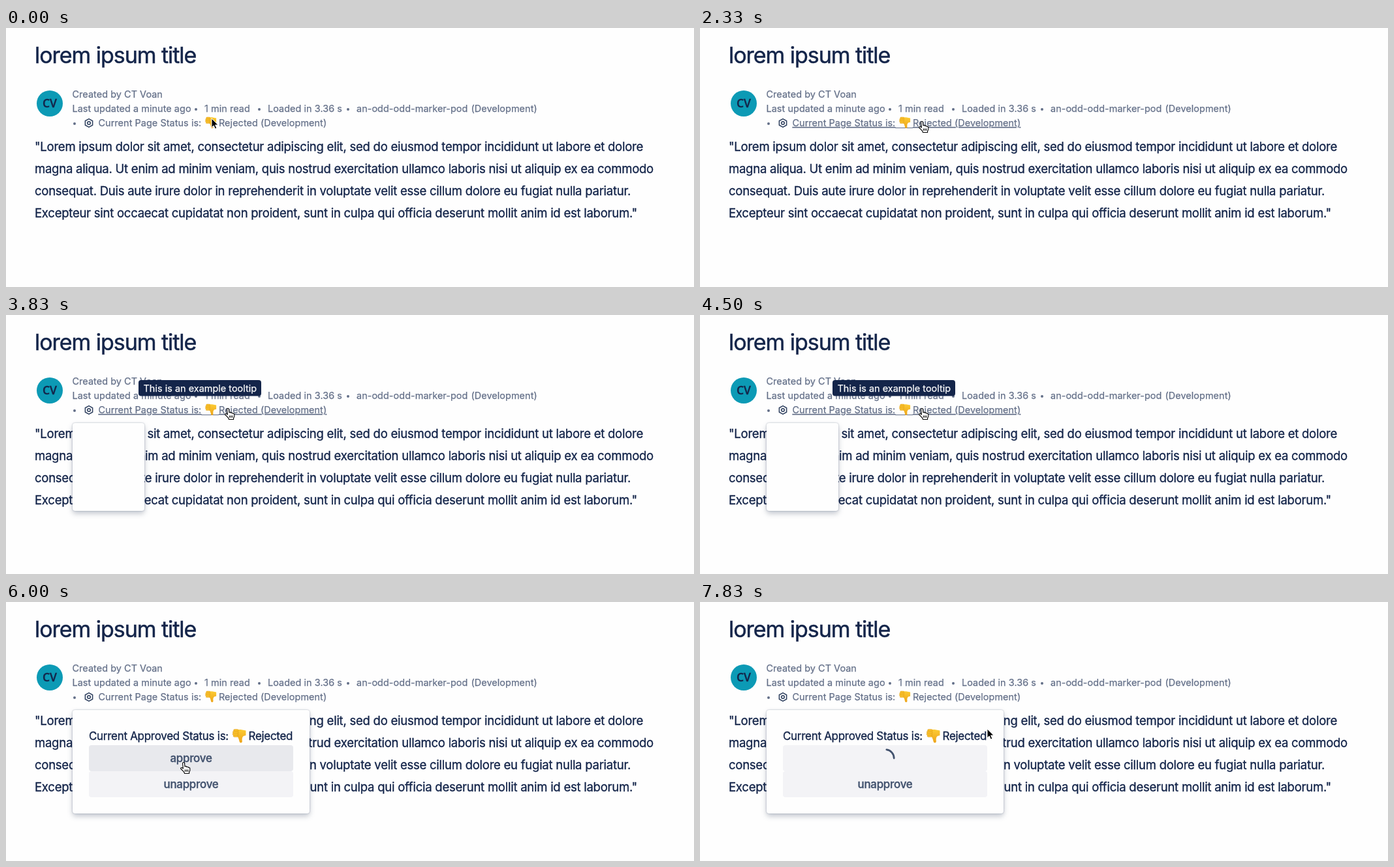
An HTML page that plays this animation: 1054 by 398 pixels, repeating every 8000 ms.

```html
<!DOCTYPE html>
<html lang="en">
<head>
<meta charset="utf-8">
<title>Page byline status</title>
<style>
  html, body { margin: 0; width: 100%; height: 100%; overflow: hidden; background: #fefefe; }
  svg { display: block; width: 1054px; height: 398px; }
  text {
    font-family: Inter, "Liberation Sans", sans-serif;
    font-optical-sizing: none;
    fill: #14254a;
    stroke: #14254a;
    stroke-width: .35px;
    white-space: pre;
  }
  .title { font-size: 34px; letter-spacing: -1.04px; stroke-width: .5px; }
  .body text { font-size: 18.5px; letter-spacing: -.246px; }
  .byline text { font-size: 14.4px; letter-spacing: .07px; fill: #636f88; stroke: #636f88; stroke-width: .25px; }
  .byline circle { fill: #636f88; }
  .initials { font: 600 17.5px "Open Sans", "Noto Sans", sans-serif; text-anchor: middle; }
  .tip rect { fill: #14254a; }
  .tip text { font-size: 14.4px; letter-spacing: .04px; fill: #fff; stroke: #fff; stroke-width: .25px; }
  .card { fill: #fefefe; filter: drop-shadow(0 4px 4px rgba(9,30,66,.2)) drop-shadow(0 0 1px rgba(9,30,66,.31)); }
  .panel text { font-size: 16.9px; letter-spacing: -.24px; }
  .panel .label { font-weight: 500; text-anchor: middle; fill: #42526e; stroke: #42526e; }
  .button { fill: #f3f3f6; }
  .spinner { fill: none; stroke: #42526e; stroke-linecap: round; }
  .linked text { text-decoration: underline; }
  #bridge { stroke: #636f88; }
</style>
</head>
<body>
<svg viewBox="0 0 1054 398">
  <defs>
    <linearGradient id="skin" x2="0" y2="1">
      <stop stop-color="#fccb33"/>
      <stop offset="1" stop-color="#eda41b"/>
    </linearGradient>
    <g id="thumb">
      <path fill="url(#skin)" d="M4 1L11 .8 17.6 2V8.2L14.6 9C12.8 10.6 12.6 12.6 13 15.6 13.1 17.8 10.4 18.2 9.6 16.2 9 13.6 8.4 11.6 7 9.6Z"/>
      <g fill="#fbc42a" stroke="#dd9614" stroke-width=".5">
        <rect x="2.2" y=".6" width="6" height="2.4" rx="1.2"/>
        <rect x="1.2" y="2.9" width="7" height="2.5" rx="1.2"/>
        <rect x="1" y="5.3" width="7" height="2.5" rx="1.2"/>
        <rect x="1.8" y="7.7" width="6" height="2.4" rx="1.2"/>
      </g>
    </g>
  </defs>

  <text class="title" x="44" y="54">lorem ipsum title</text>

  <circle cx="67" cy="116" r="20" fill="#0c9ab5"/>
  <text class="initials" x="67" y="122.3">CV</text>

  <g class="byline">
    <text x="101.5" y="107">Created by CT Voan</text>
    <text x="101.5" y="129">Last updated a minute ago</text>
    <text x="304" y="129">1 min read</text>
    <text x="401" y="129">Loaded in 3.36 s</text>
    <text x="537" y="129">an-odd-odd-marker-pod</text>
    <text x="712.5" y="129">(Development)</text>
    <circle cx="291" cy="125" r="2"/>
    <circle cx="388" cy="125" r="2"/>
    <circle cx="524" cy="125" r="2"/>
    <circle cx="105" cy="147" r="2"/>
    <g fill="none" stroke="#344563" stroke-width="1.6" stroke-linejoin="round">
      <path d="M127 139.6L132.6 142.8V149.2L127 152.4 121.4 149.2V142.8Z"/>
      <path d="M129.3 146a2.3 2.3 0 1 1-4.6 0a2.3 2.3 0 1 1 4.6 0Z"/>
    </g>
    <g id="status">
      <text x="141.5" y="151">Current Page Status is:</text>
      <text x="326" y="151">Rejected (Development)</text>
      <path id="bridge" d="M299 153.5H326"/>
    </g>
    <use href="#thumb" x="304.5" y="136.5"/>
  </g>

  <g class="body">
    <text x="44" y="189">"Lorem ipsum dolor sit amet, consectetur adipiscing elit, sed do eiusmod tempor incididunt ut labore et dolore</text>
    <text x="44" y="223">magna aliqua. Ut enim ad minim veniam, quis nostrud exercitation ullamco laboris nisi ut aliquip ex ea commodo</text>
    <text x="44" y="257">consequat. Duis aute irure dolor in reprehenderit in voluptate velit esse cillum dolore eu fugiat nulla pariatur.</text>
    <text x="44" y="291">Excepteur sint occaecat cupidatat non proident, sunt in culpa qui officia deserunt mollit anim id est laborum."</text>
  </g>

  <g id="loader">
    <rect class="card" x="102" y="166" width="110" height="135" rx="4"/>
    <path id="bigSpin" class="spinner" stroke-width="5.6"/>
  </g>

  <g id="panel" class="panel">
    <rect class="card" x="102" y="166" width="363" height="159" rx="4"/>
    <text x="127" y="212">Current Approved Status is:</text>
    <use href="#thumb" transform="translate(346 195) scale(1.22)"/>
    <text x="371.5" y="212">Rejected</text>
    <rect id="approve" class="button" x="127" y="220" width="313" height="40" rx="4"/>
    <rect class="button" x="127" y="260" width="313" height="40" rx="4"/>
    <text id="approveLabel" class="label" x="283.5" y="246">approve</text>
    <text class="label" x="283.5" y="286">unapprove</text>
    <path id="smallSpin" class="spinner" stroke-width="2.8"/>
  </g>

  <g id="tip" class="tip">
    <rect x="203" y="100" width="188" height="24.5" rx="4"/>
    <text x="210.5" y="118">This is an example tooltip</text>
  </g>

  <g id="cursor">
    <circle id="ring" r="28.5" fill="none" stroke="#000" stroke-width="3"/>
    <path id="arrow" stroke="#fff" d="M0 0V14L3.2 11 5.4 16 7.8 15 5.6 10H10Z"/>
    <g id="hand" fill="#fff" stroke="#000" stroke-width="1.1" stroke-linejoin="round">
      <path d="M-1.5 2C-1.5 0 1.4 0 1.5 2L2 7C2.6 6 4.6 6.2 4.8 7.6 5.6 6.9 7.2 7.3 7.4 8.5 8.4 8 9.8 8.6 9.8 10V13L8.6 15.5V17.5H1.5L1 15.8-1 13.4-4 10.5C-5 9.2-3.6 8-2.2 8.8L-.6 10Z"/>
      <path d="M2.4 11.5V14.8M4.6 11.5V14.8M6.8 11.5V14.8"/>
    </g>
  </g>
</svg>
<script>
  const LOOP = 8000, FPS = 6;
  const $ = id => document.getElementById(id);

  // Pointer stops: time, x, y
  const route = [
    [0, 315, 139], [1830, 315, 139], [2165, 340, 143], [4660, 340, 143],
    [5165, 276, 259], [5500, 272, 246], [6830, 272, 246], [7660, 440, 195], [LOOP, 440, 195]
  ];

  const clamp = v => Math.min(1, Math.max(0, v));
  const within = (t, from, to) => t >= from - 5 && t < to - 5;
  const show = (id, on) => { $(id).style.display = on ? '' : 'none'; };

  function pointer(t) {
    const i = Math.max(1, route.findIndex(stop => stop[0] > t));
    const [t0, x0, y0] = route[i - 1], [t1, x1, y1] = route[i];
    const p = clamp((t - t0) / (t1 - t0)), e = p * p * (3 - 2 * p);
    return [x0 + (x1 - x0) * e, y0 + (y1 - y0) * e];
  }

  // The arc grows and fades in for one second, then keeps turning.
  function spin(id, cx, cy, r, age) {
    const p = clamp(age / 1000) ** 2;
    const start = 122 + 156 * p + Math.max(0, age - 1000) / 860 * 360;
    const at = deg => {
      const a = deg * Math.PI / 180;
      return `${cx + r * Math.cos(a)} ${cy + r * Math.sin(a)}`;
    };
    $(id).setAttribute('d', `M${at(start)}A${r} ${r} 0 0 1 ${at(start + 82 * p + .1)}`);
    $(id).style.opacity = p;
  }

  function render(time) {
    const t = Math.floor((time + 4) * FPS / 1000) * 1000 / FPS;
    const [x, y] = pointer(t);
    const linked = within(t, 2000, 4830);
    const pressed = within(t, 6500, 6830), busy = t >= 6825;

    $('cursor').setAttribute('transform', `translate(${x} ${y})`);
    const hand = linked || within(t, 5000, 7000);
    show('hand', hand);
    show('arrow', !hand);
    show('ring', within(t, 2500, 2670) || pressed);

    $('status').setAttribute('class', linked ? 'linked' : '');
    show('bridge', linked);

    show('tip', within(t, 2670, 5500));
    $('tip').style.opacity = within(t, 5330, 5500) ? .5 : 1;

    show('loader', within(t, 2670, 4670));
    show('bigSpin', t < 3825);
    spin('bigSpin', 157, 233, 26.3, t - 2667);

    show('panel', t >= 4665);
    const hover = within(t, 5000, 6500);
    $('approve').style.fill = pressed ? '#c8ddf7' : hover ? '#e8e9ed' : '';
    const ink = pressed ? '#1763a0' : '';
    Object.assign($('approveLabel').style, { fill: ink, stroke: ink });
    show('approveLabel', !busy);
    show('smallSpin', busy);
    spin('smallSpin', 284, 240, 13.2, t - 6833);
  }

  const begin = performance.now();
  function tick() {
    render((performance.now() - begin) % LOOP);
    requestAnimationFrame(tick);
  }
  tick();
</script>
</body>
</html>
```
